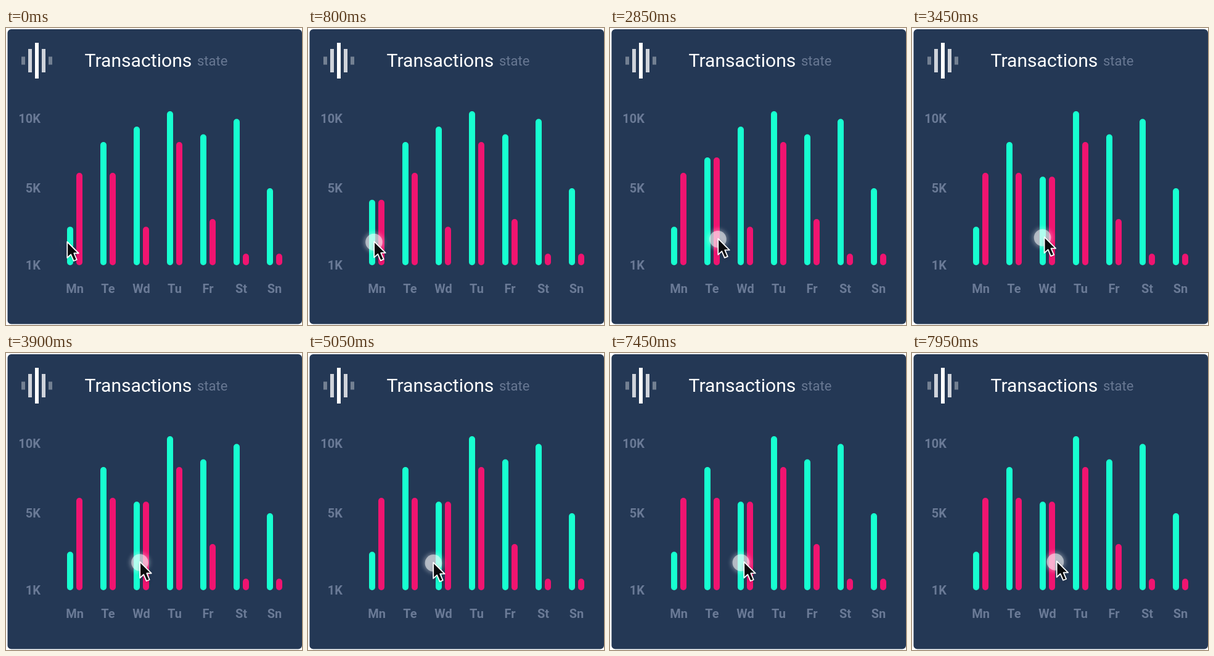
Write an HTML page that moves like this. It is 480 px wide and 482 px high and loops after 8 s.

```html
<!DOCTYPE html>
<html lang="en">
<head>
<meta charset="utf-8">
<title>Transactions</title>
<style>
  html, body { margin: 0; width: 100%; height: 100%; overflow: hidden; background: #fff; }
  svg { display: block; width: 480px; height: 482px; font-family: Roboto, Arial, sans-serif; }
  .label { font-size: 20px; font-weight: 700; fill: #6a7a96; }
</style>
</head>
<body>
<svg viewBox="0 0 480 482">
  <defs>
    <filter id="soft" x="-60%" y="-60%" width="220%" height="220%">
      <feGaussianBlur stdDeviation="3"/>
    </filter>
    <path id="arrow" d="M1 2V28L7 22.5 11.5 33 16.5 31 12 20.5H19.5Z"/>
  </defs>
  <rect x="2.5" y="2" width="477.5" height="478.5" rx="6" fill="#243855"/>
  <g id="icon"></g>
  <text x="127.5" y="62.8" font-size="30.15" fill="#fff">Transactions</text>
  <text x="310" y="60.8" font-size="22" fill="#687893">state</text>
  <g id="axis" class="label" text-anchor="end"></g>
  <g id="days" class="label" text-anchor="middle"></g>
  <g id="bars"></g>
  <g id="spot" fill="#fff">
    <circle r="16.5" opacity=".3" filter="url(#soft)"/>
    <circle r="13.8" opacity=".52"/>
  </g>
  <g id="cursor">
    <use href="#arrow" y="1.5" opacity=".25" filter="url(#soft)"/>
    <use href="#arrow" fill="#0b0b0d" stroke="#fff" stroke-width="1.8" stroke-linejoin="round"/>
  </g>
</svg>
<script>
const LOOP = 8000, BASE = 385, UNIT = 12.5, PITCH = 54, FIRST = 111.5;
const LAG = 90, SETTLE = 180, REACH = 18;
const days = ['Mn', 'Te', 'Wd', 'Tu', 'Fr', 'St', 'Sn'];
const income = [5, 16, 18, 20, 17, 19, 10];
const spent = [12, 12, 5, 16, 6, 1.5, 1.5];

// Pointer moves: start, end, destination x
const moves = [
  [0, 250, 107],
  [1300, 2700, 175],
  [2850, 3650, 217],
  [4550, 5050, 203],
  [6200, 6550, 206],
  [7250, 8300, 238]
];

const $ = id => document.getElementById(id);
const clamp = v => Math.max(0, Math.min(1, v));
const mix = (a, b, k) => a + (b - a) * k;
const easeOut = k => 1 - (1 - clamp(k)) ** 2;
const center = i => FIRST + PITCH * i;

const pointerX = t => moves.reduce((x, [from, to, goal]) => mix(x, goal, easeOut((t - from) / (to - from))), 99);
const pointerY = x => 346 - (x - 99) * 0.068;
const hovers = (i, t) => t >= 0 && Math.abs(pointerX(t) - center(i)) < REACH;

// Share of the recent past that the pointer spent over a day
function merged(i, t) {
  const steps = 36;
  let hits = 0;
  for (let n = 0; n < steps; n++) hits += hovers(i, t - SETTLE * n / steps);
  const k = hits / steps;
  return k * k * (3 - 2 * k);
}

function add(parent, tag, attrs, text = '') {
  const node = document.createElementNS('http://www.w3.org/2000/svg', tag);
  for (const name in attrs) node.setAttribute(name, attrs[name]);
  node.textContent = text;
  return $(parent).appendChild(node);
}

function place(id, x, y) {
  $(id).setAttribute('transform', `translate(${x} ${y})`);
}

for (let i = -2; i <= 2; i++) {
  const far = Math.abs(i), height = 58 - 20 * far - 2.5 * far * (far - 1);
  add('icon', 'rect', {
    x: 47 + 11 * i, y: 53 - height / 2, width: 6, height, fill: '#fff', opacity: [1, .78, .36][far]
  });
}

[['10K', 154], ['5K', 266.5], ['1K', 391.5]].forEach(([text, y]) => add('axis', 'text', { x: 56, y }, text));

const bars = days.map((day, i) => {
  add('days', 'text', { x: center(i), y: 429.5 }, day);
  return ['#17ffd0', '#f01470'].map((fill, j) =>
    add('bars', 'rect', { x: center(i) - 12.5 + 15 * j, width: 10, rx: 5, fill }));
});

function draw(t) {
  const x = pointerX(t), spotX = pointerX(t - LAG);
  place('cursor', x - 0.8, pointerY(x) - 1);
  place('spot', spotX, pointerY(spotX) + 2);
  $('spot').setAttribute('opacity', clamp(t / 250));
  bars.forEach((pair, i) => {
    const k = merged(i, t), middle = (income[i] + spent[i]) / 2;
    [income[i], spent[i]].forEach((value, j) => {
      const height = UNIT * mix(value, middle, k);
      pair[j].setAttribute('y', BASE - height);
      pair[j].setAttribute('height', height);
    });
  });
}

const start = performance.now();
function tick() {
  draw((performance.now() - start) % LOOP);
  requestAnimationFrame(tick);
}
tick();
</script>
</body>
</html>
```
